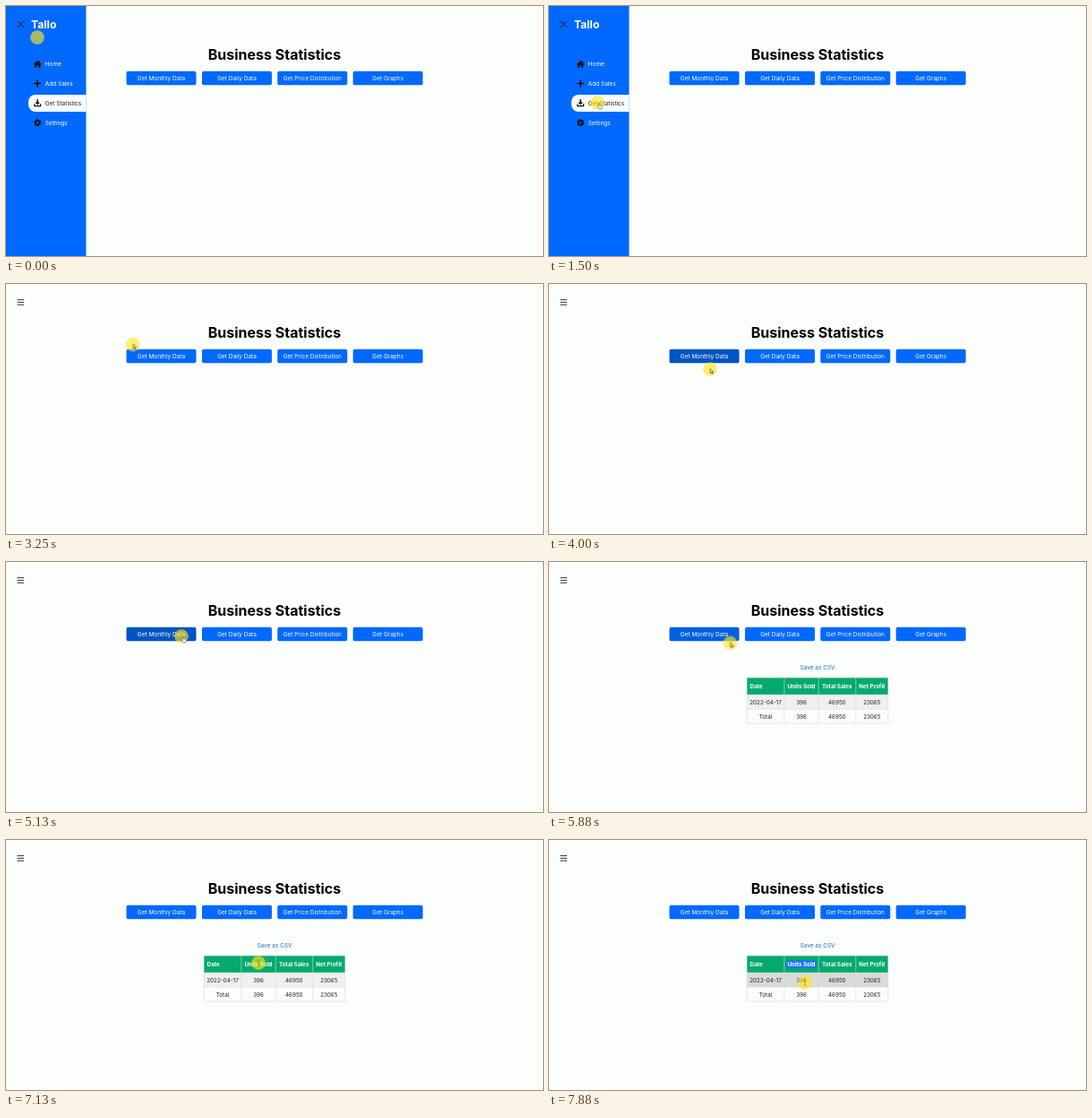
An HTML page for the animation above (8 s loop, 600 by 279 pixels).

```html
<!DOCTYPE html>
<html lang="en">
<head>
<meta charset="utf-8">
<title>Business Statistics</title>
<style>
html, body { margin: 0; width: 100%; height: 100%; overflow: hidden; background: #fbfefb; }
svg { display: block; width: 600px; height: 279px; }
text { font: 400 6.5px Inter, "Open Sans", sans-serif; fill: #222; }
.mid text, text.mid { text-anchor: middle; }
.title { font-size: 16px; font-weight: 700; fill: #000; }
.brand { font-size: 12.2px; font-weight: 700; fill: #fff; }
.light text { fill: #fff; }
.head text { fill: #fff; font-weight: 700; font-size: 6.3px; }
.cells text { font-size: 6.3px; }
.link { fill: #1a6fd8; }
.btn { fill: #0069ff; }

.sidebar, .cursor, .table, .hot, .row1, .row2, .pick, .arrow, .hand, .beam {
  animation: 8s infinite step-end both;
}
.sidebar { animation-name: slide; animation-timing-function: ease; }
.cursor { animation-name: move; animation-timing-function: ease-in-out; }
.hot { animation-name: hot; animation-timing-function: linear; }
.table { animation-name: table; }
.row1 { animation-name: row1; }
.row2 { animation-name: row2; }
.pick { animation-name: pick; }
.arrow { animation-name: arrow; }
.hand { animation-name: hand; }
.beam { animation-name: beam; }

@keyframes slide {
  0%, 34.8% { transform: translateX(0); }
  39.5%, 100% { transform: translateX(-92px); }
}
@keyframes move {
  0%, 1.7% { transform: translate(35px, 35px); }
  3.75% { transform: translate(29px, 31px); }
  9% { transform: translate(48px, 126px); }
  11% { transform: translate(50px, 106px); }
  15% { transform: translate(50px, 67px); }
  18.7%, 21.9% { transform: translate(54px, 108px); }
  23.5% { transform: translate(50px, 114px); }
  30.6% { transform: translate(9px, 13px); }
  32.9%, 35% { transform: translate(15px, 20px); }
  43% { transform: translate(170px, 78px); }
  45.4% { transform: translate(174px, 67px); }
  49.9%, 51.2% { transform: translate(180px, 95px); }
  56.2%, 61% { transform: translate(191px, 81px); }
  64%, 71.9% { transform: translate(196px, 83px); }
  80% { transform: translate(276px, 174px); }
  82.8%, 83.7% { transform: translate(277px, 177px); }
  88% { transform: translate(282px, 137px); }
  94.4% { transform: translate(283px, 138px); }
  98.4%, 100% { transform: translate(286px, 159px); }
}
@keyframes hot {
  0%, 42.3% { fill: #0069ff; }
  44%, 51.2% { fill: #0054c4; }
  53%, 54.5% { fill: #0069ff; }
  56.2%, 72.5% { fill: #0054c4; }
  74.5%, 100% { fill: #0069ff; }
}
@keyframes table { 0% { visibility: hidden; } 68.7%, 100% { visibility: visible; } }
@keyframes row1 {
  0% { fill: #eff0ef; }
  77% { fill: #d9dbd9; }
  78.4% { fill: #eff0ef; }
  84.9% { fill: #d9dbd9; }
  86.2% { fill: #eff0ef; }
  96.8%, 100% { fill: #d9dbd9; }
}
@keyframes row2 {
  0% { fill: #fbfefb; }
  78.4% { fill: #d9dbd9; }
  84.9%, 100% { fill: #fbfefb; }
}
@keyframes pick { 0% { visibility: hidden; } 90.6%, 100% { visibility: visible; } }
@keyframes arrow {
  0% { visibility: hidden; }
  36.5% { visibility: visible; }
  42.6% { visibility: hidden; }
  44.7% { visibility: visible; }
  54.5% { visibility: hidden; }
  73% { visibility: visible; }
  86%, 100% { visibility: hidden; }
}
@keyframes hand {
  0% { visibility: hidden; }
  5.5% { visibility: visible; }
  36.5% { visibility: hidden; }
  42.6% { visibility: visible; }
  44.7% { visibility: hidden; }
  54.5% { visibility: visible; }
  73%, 100% { visibility: hidden; }
}
@keyframes beam { 0% { visibility: hidden; } 86%, 100% { visibility: visible; } }
</style>
</head>
<body>
<svg viewBox="0 0 600 279">
  <rect width="600" height="279" fill="#fbfefb"/>

  <path d="M12.5 17.6h7.6M12.5 20.4h7.6M12.5 23.2h7.6" stroke="#333" stroke-width="1"/>
  <text class="title mid" x="300" y="60">Business Statistics</text>

  <g class="btn">
    <rect class="hot" x="134.5" y="72.7" width="78" height="15.6" rx="2"/>
    <rect x="219" y="72.7" width="78" height="15.6" rx="2"/>
    <rect x="303.3" y="72.7" width="78" height="15.6" rx="2"/>
    <rect x="387.7" y="72.7" width="78" height="15.6" rx="2"/>
  </g>
  <g class="light mid">
    <text x="173.5" y="82.7">Get Monthly Data</text>
    <text x="258" y="82.7">Get Daily Data</text>
    <text x="342.3" y="82.7">Get Price Distribution</text>
    <text x="426.7" y="82.7">Get Graphs</text>
  </g>

  <g class="table">
    <text class="link mid" x="300" y="120.3">Save as CSV</text>
    <rect x="221" y="129" width="158" height="19.2" fill="#04aa6d"/>
    <rect class="row1" x="221" y="148.2" width="158" height="16"/>
    <rect class="row2" x="221" y="164.2" width="158" height="16.2"/>
    <path d="M221.2 129V180.4M262.9 129V180.4M301.2 129V180.4M342.8 129V180.4M378.8 129V180.4M221 129.2H379M221 148.2H379M221 164.2H379M221 180.2H379"
      fill="none" stroke="#d8dcd9" stroke-width=".6"/>
    <rect class="pick" x="265.5" y="134" width="33" height="9.2" fill="#1677f2"/>
    <g class="head mid">
      <text x="224.6" y="141" style="text-anchor:start">Date</text>
      <text x="282" y="141">Units Sold</text>
      <text x="321.8" y="141">Total Sales</text>
      <text x="360.8" y="141">Net Profit</text>
    </g>
    <g class="cells mid">
      <text x="242" y="158.5">2022-04-17</text>
      <text x="282" y="158.5">396</text>
      <text x="321.8" y="158.5">46950</text>
      <text x="360.8" y="158.5">23065</text>
      <text x="242" y="174.5">Total</text>
      <text x="282" y="174.5">396</text>
      <text x="321.8" y="174.5">46950</text>
      <text x="360.8" y="174.5">23065</text>
    </g>
  </g>

  <g class="sidebar">
    <rect x="-2" width="91.5" height="279" fill="#0069ff"/>
    <path d="M12.8 16.8l7.2 7.2M20 16.8l-7.2 7.2" stroke="#111" stroke-width="1"/>
    <text class="brand" x="28" y="25.4">Tallo</text>
    <path d="M89.6 99H33a8 8 0 0 0-8 8v3a8 8 0 0 0 8 8H89.6z" fill="#fbfefb"/>
    <g class="light">
      <text x="43.7" y="67">Home</text>
      <text x="43.7" y="88.8">Add Sales</text>
      <text x="43.7" y="110.6" style="fill:#222">Get Statistics</text>
      <text x="43.7" y="132.5">Settings</text>
    </g>
    <g fill="#111">
      <path d="M30.8 65.1L35.2 61l1.6 1.5v-1h1.3v2.2l1.5 1.4-.7.7-.6-.5v3.4h-2.2v-2.4h-1.8v2.4h-2.2v-3.4l-.6.5z"/>
      <path d="M34.4 82.6h1.6v3.1h3.1v1.6H36v3.1h-1.6v-3.1h-3.1v-1.6h3.1z"/>
      <path d="M34.4 104.2h1.6v3.4h2l-2.8 2.9-2.8-2.9h2zM31.2 109.3h1.2v1.8h5.6v-1.8h1.2v3H31.2z"/>
    </g>
    <g stroke="#111" fill="none">
      <circle cx="35.2" cy="130.3" r="2.2" stroke-width="2"/>
      <circle cx="35.2" cy="130.3" r="3.4" stroke-width="1.3" stroke-dasharray="1.9 1.66"/>
    </g>
  </g>

  <g class="cursor">
    <circle r="7.8" fill="#ffe818" fill-opacity=".64"/>
    <path class="arrow" d="M.2-.3V4.6L1.4 3.5l.8 1.8.9-.4-.8-1.7H3.8z" fill="#fff" stroke="#222" stroke-width=".6"/>
    <path class="hand" d="M1.2.2q.7-.6 1.2.2V2.6l2.4.6q.7.3.5 1.2L4.8 6.8H1.9L.1 4.5q0-.7 1.1-.2z" fill="#fff" stroke="#333" stroke-width=".5"/>
    <path class="beam" d="M-.8-3H.8M0-3V3M-.8 3H.8" fill="none" stroke="#555" stroke-width=".5"/>
  </g>
</svg>
</body>
</html>
```
